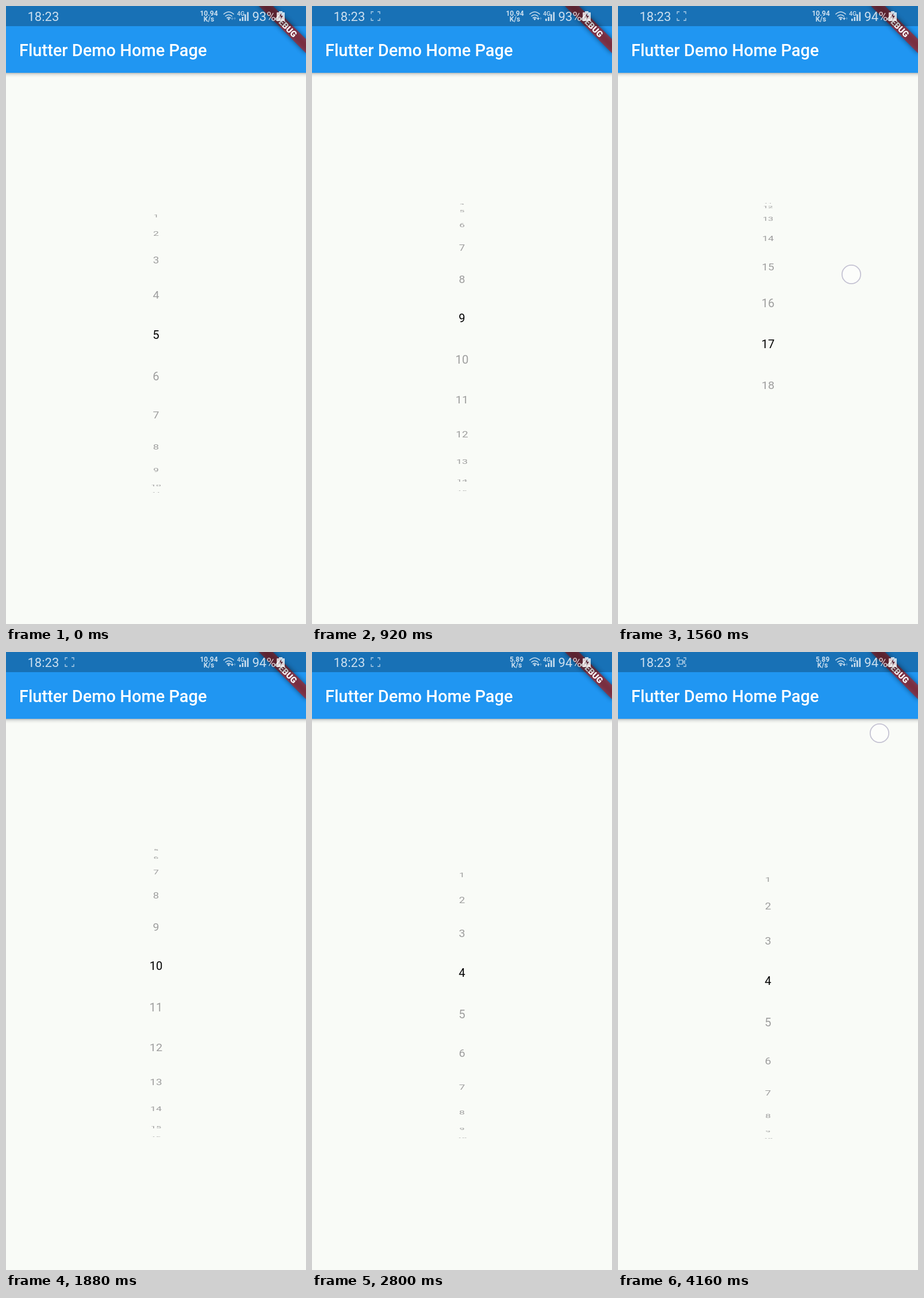
These frames come from a looping animation (522 px wide and 1073 px high, 4.2 s). An HTML page:

```html
<!DOCTYPE html>
<html lang="en">
<head>
<meta charset="utf-8">
<title>Wheel picker</title>
<style>
  html, body { margin: 0; width: 100%; height: 100%; overflow: hidden; background: #f9fbf7; }
  svg { display: block; width: 100vw; height: 100vh; font-family: Roboto, sans-serif; }
</style>
</head>
<body>
<svg viewBox="0 0 522 1073">
  <defs>
    <linearGradient id="shade" x1="0" y1="0" x2="0" y2="1">
      <stop offset="0" stop-color="#000" stop-opacity=".26"/>
      <stop offset=".4" stop-color="#000" stop-opacity=".08"/>
      <stop offset="1" stop-color="#000" stop-opacity="0"/>
    </linearGradient>
    <filter id="blur" x="-20%" y="-100%" width="140%" height="300%">
      <feGaussianBlur stdDeviation="4.5"/>
    </filter>
  </defs>
  <rect width="522" height="1073" fill="#f9fbf7"/>
  <g id="wheel" font-size="20.3" text-anchor="middle"></g>

  <rect y="116" width="522" height="8" fill="url(#shade)"/>
  <rect width="522" height="116" fill="#2096f2"/>
  <text x="23" y="87" font-size="29" font-weight="500" fill="#fff">Flutter Demo Home Page</text>

  <g transform="translate(522 0) rotate(45)">
    <rect x="-58" y="40.6" width="116" height="17.4" fill="#000" opacity=".5" filter="url(#blur)"/>
    <rect x="-90" y="40.6" width="180" height="17.4" fill="#b71c1c" fill-opacity=".627"/>
    <text y="54.6" font-size="14.8" font-weight="900" text-anchor="middle" fill="#fff">DEBUG</text>
  </g>

  <rect width="522" height="35" fill="#000" opacity=".25"/>
  <g fill="#fff" opacity=".78">
    <text x="37.5" y="26" font-size="22">18:23</text>
    <g id="corners" fill="none" stroke="#fff" stroke-width="1.3" opacity=".85">
      <path d="M103 14V10H107M114 10H118V14M118 21V25H114M107 25H103V21"/>
      <path id="camera" d="M106 14H112.5V21H106ZM113 17L116 15V20L113 18"/>
    </g>
    <g font-size="12" font-weight="700" text-anchor="middle">
      <text id="rate" y="17"></text>
      <text id="unit" y="27">K/s</text>
    </g>
    <g fill="none" stroke="#fff" stroke-width="1.6">
      <path d="M378.5 14.5Q387.5 6 396.5 14.5M381.5 18Q387.5 12.5 393.5 18M384 21.2Q387.5 18 391 21.2"/>
    </g>
    <path d="M385.3 22.2Q387.5 20.4 389.7 22.2L387.5 25Z"/>
    <path id="down" d="M391 21H393V19H394V21H396L393.5 24.5Z"/>
    <path d="M396 22L398 19.5L400 22H398.5V24H397.5V22Z" opacity=".4"/>
    <text x="402" y="17" font-size="10.5" font-weight="500">4G</text>
    <path d="M406 22h2.6v4h-2.6zM410.5 19h2.6v7h-2.6zM415 14.5h2.6v11.5h-2.6zM419.5 10.5h2.6v15.5h-2.6z"/>
    <text id="charge" x="428.5" y="26" font-size="22"></text>
    <path fill-rule="evenodd" d="M475 9H481V11H484Q485 11 485 12V25Q485 26 484 26H472Q471 26 471 25V12Q471 11 472 11H475ZM479.5 12L474 19.5H477.5L476.5 25L482 17H478.5Z"/>
  </g>
  <circle id="touch" r="16.2" fill="#fff" fill-opacity=".4" stroke="#c5c3d3" stroke-width="1.8"/>
</svg>
<script>
const LOOP = 4200, TICK = 40, COUNT = 18;
const MID = 594.5, RADIUS = 430, DEPTH = 0.96 / RADIUS, STEP = 0.168, TEXT_Y = -23.6;
const $ = id => document.getElementById(id);
const wheel = $('wheel');

const labels = Array.from({ length: COUNT }, (_, i) => {
  const el = document.createElementNS('http://www.w3.org/2000/svg', 'text');
  el.textContent = i + 1;
  el.setAttribute('y', 7.2);
  return wheel.appendChild(el);
});

// Share of a fling still to travel after u ms
const glide = (u, scale, power) => Math.exp(-Math.pow(u / scale, power));

function scrollAt(t) {
  if (t < 480) return 5 + 2 * Math.sin(Math.PI * t / 480) ** 2;
  if (t < 760) return 5;
  if (t < 1600) return 18 - 13 * glide(t - 760, 361, 1.082);
  if (t < 3400) return 4 + 12.9 * glide(t - 1600, 372.5, 1.217);
  return 4;
}

// Finger paths: start, end, from x, y, to x, y
const touches = [
  [760, 840, 480, 720, 470, 250],
  [1560, 1640, 406, 466, 426, 760],
  [3400, 3920, 475, 787, 475, 787],
  [4120, 4200, 477, 559, 433, -277]
];

// A point on a plane tangent to the cylinder, seen in perspective
function project(angle, y) {
  const s = Math.sin(angle), c = Math.cos(angle);
  const w = 1 + DEPTH * (RADIUS - RADIUS * c + y * s);
  return { y: (y * c + RADIUS * s) / w, w };
}

function drawWheel(pos) {
  const chosen = Math.round(pos);
  labels.forEach((el, i) => {
    const angle = (i + 1 - pos) * STEP;
    const shown = Math.abs(angle) < 1.08;
    el.setAttribute('visibility', shown ? 'visible' : 'hidden');
    if (!shown) return;
    const p = project(angle, TEXT_Y);
    const sy = (project(angle, TEXT_Y + 8).y - project(angle, TEXT_Y - 8).y) / 16;
    el.setAttribute('transform', `matrix(${1 / p.w} 0 0 ${Math.max(sy, 0.08)} 261 ${MID + p.y})`);
    el.setAttribute('fill', i + 1 === chosen ? '#000' : '#9e9e9e');
  });
}

function drawStatus(t) {
  const fast = t < 2000, x = fast ? 353 : 356;
  const toggles = [1000, 1400, 1900, 2500, 3000, 3920, 4120];
  const lit = toggles.filter(k => t >= k).length % 2 === 1;
  $('corners').setAttribute('visibility', t < 40 ? 'hidden' : 'visible');
  $('camera').setAttribute('opacity', lit ? 1 : 0);
  $('rate').textContent = fast ? '10.94' : '5.89';
  $('rate').setAttribute('x', x);
  $('unit').setAttribute('x', x);
  $('charge').textContent = t < 1000 ? '93%' : '94%';
  $('down').setAttribute('opacity', t < 40 ? 0.4 : 1);
}

function drawTouch(t) {
  const path = touches.find(([a, b]) => t >= a && t < b);
  const dot = $('touch');
  dot.setAttribute('visibility', path ? 'visible' : 'hidden');
  if (!path) return;
  const [a, b, x0, y0, x1, y1] = path, k = (t - a) / (b - a);
  dot.setAttribute('cx', x0 + (x1 - x0) * k);
  dot.setAttribute('cy', y0 + (y1 - y0) * k);
}

function render(ms) {
  const t = Math.floor((ms % LOOP) / TICK) * TICK;
  drawWheel(scrollAt(t));
  drawStatus(t);
  drawTouch(t);
}

const begin = performance.now();
function frame() {
  render(performance.now() - begin);
  requestAnimationFrame(frame);
}
frame();
</script>
</body>
</html>
```
